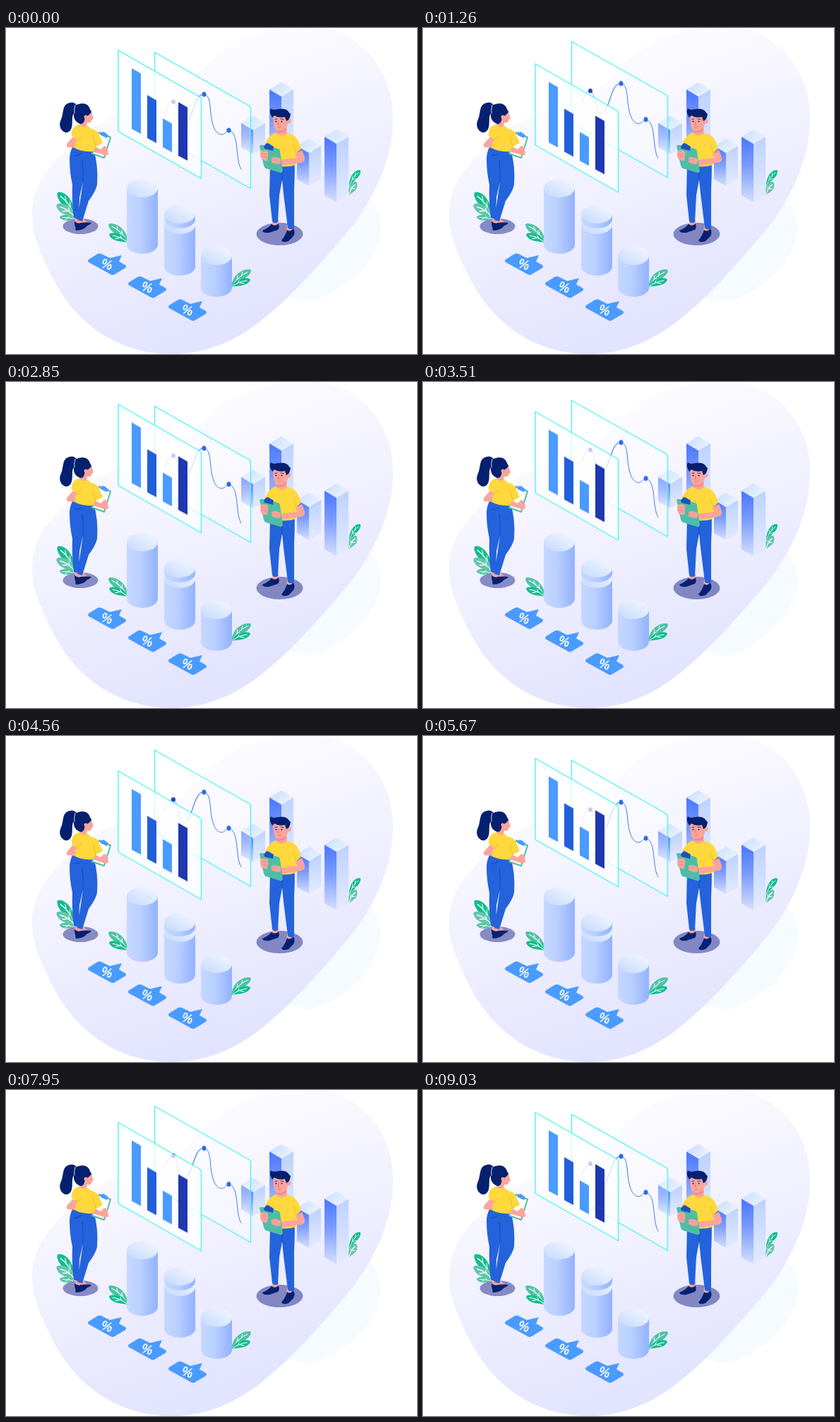
Write an HTML page that moves like this. It is 582x462 px and loops after 9060 ms.

```html
<!DOCTYPE html>
<html lang="en">
<head>
<meta charset="utf-8">
<title>Isometric analytics</title>
<style>
html, body { margin: 0; width: 100%; height: 100%; overflow: hidden; background: #fff; }
svg { display: block; width: 582px; height: 462px; }
.panel { animation: drift 9060ms infinite; }
.front { --shift: 20px; }
.back { --shift: -16px; }
@keyframes drift {
  0%, 30.46%, 63.47%, 100% {
    transform: translateY(0);
    animation-timing-function: cubic-bezier(.33, 0, .63, 1);
  }
  15.89%, 46.96%, 80.68% {
    transform: translateY(var(--shift));
    animation-timing-function: cubic-bezier(.37, 0, .67, 1);
  }
}
.sheet { stroke: #3ff5f3; stroke-width: 1.3; stroke-linejoin: round; }
.vein { fill: none; stroke: #fff; stroke-width: 1; stroke-linecap: round; }
.skin { fill: #f9a59b; }
.navy { fill: #05206f; }
.shirt { fill: #ffd83d; }
.jeans { fill: #2463dc; }
.teal { fill: #4fbda6; }
.sky { fill: #4a9bff; }
.line { fill: none; stroke-linecap: round; stroke-linejoin: round; }
text { font: 600 19px "Open Sans", Arial, sans-serif; fill: #fff; text-anchor: middle; }
</style>
</head>
<body>
<svg viewBox="0 0 582 462" xmlns="http://www.w3.org/2000/svg">
<defs>
  <linearGradient id="ground" gradientUnits="userSpaceOnUse" x1="43" y1="123" x2="165" y2="472">
    <stop stop-color="#fcfbff"/><stop offset="1" stop-color="#e3e4ff"/>
  </linearGradient>
  <linearGradient id="tube">
    <stop stop-color="#c6d8ff"/><stop offset=".45" stop-color="#b9cfff"/><stop offset="1" stop-color="#92b2ff"/>
  </linearGradient>
  <linearGradient id="lid" x1="0" y1="1" x2="1" y2="0">
    <stop stop-color="#c4d9ff"/><stop offset="1" stop-color="#f4f8ff"/>
  </linearGradient>
  <linearGradient id="lit" x1="0" y1="0" x2="0" y2="1">
    <stop stop-color="#4a76ff"/><stop offset=".45" stop-color="#7c9cff"/><stop offset="1" stop-color="#d6dffe"/>
  </linearGradient>
  <linearGradient id="pale" x1="0" y1="0" x2="0" y2="1">
    <stop stop-color="#bcd2ff"/><stop offset="1" stop-color="#e5ebff"/>
  </linearGradient>
  <linearGradient id="cap" x1="0" x2="1" y1="0" y2=".6">
    <stop stop-color="#c6dcff"/><stop offset="1" stop-color="#eaf3ff"/>
  </linearGradient>
  <g id="tall">
    <path d="M0 0C-1-12 10-25 24-25C28-25 27-22 26-20C22-12 9-9 0 0Z"/>
    <path class="vein" d="M1-2Q8-15 22-21M7-10L8-16M13-15L15-21M9-11L17-12"/>
  </g>
  <g id="low">
    <path d="M0 0C3-9 13-15 24-12C27-11 26-9 24-7C19-1 8-2 0 0Z"/>
    <path class="vein" d="M1-1Q10-8 21-9M8-5L10-9M11-6L17-5"/>
  </g>
  <g id="plant">
    <use href="#tall" fill="#4dc3a2"/>
    <use href="#low" fill="#12bd8d"/>
  </g>
  <g id="tag">
    <path class="sky" d="M117 328L130 320Q132 319 135 320L147 326L164 322L160 331L169 336Q171 338 169 340L154 349Q151 351 148 349L117 332Q115 330 117 328Z"/>
    <text transform="matrix(.95 .28 -.38 .92 140.500 341)">%</text>
  </g>
</defs>

<!-- Ground -->
<path fill="#f6fbff" d="M505 235C528 250 534 273 529 297C520 334 480 374 430 388L395 380Z"/>
<path fill="url(#ground)" d="M432-2C502 2 548 60 548 128C548 195 512 256 479 294C440 340 400 385 357 418C320 446 280 462 235 462C155 462 95 415 64 350C47 315 36 290 37 262C38 215 70 185 110 150C150 118 200 115 240 92C282 67 300-2 432-2Z"/>

<!-- Towers -->
<g id="towers"></g>
<use href="#tall" fill="#12bd8d" transform="translate(486 225) scale(.6 .95)"/>
<use href="#low" fill="#63c6ab" transform="translate(486 237) rotate(-22) scale(.65 1.200)"/>

<!-- Panels -->
<g class="panel back">
  <path class="sheet" fill="#fff" fill-opacity=".35" d="M210.500 34.500L344 110Q346.500 112 346.500 114V227.500L210.500 150Z"/>
  <g class="line" stroke="#3f78ea" stroke-width="1">
    <path stroke="#9aa9dc" d="M224 122C229 111 231 104 237 104C245 107 242 137 252 137C264 136 266 92 281 94"/>
    <path d="M257 133C267 120 267 92 281 94C291 97 288 116 292 133C295 146 300 151 306 151C311 150 312 145 316 145C331 150 324 186 333 200"/>
  </g>
  <g fill="#2d6be2">
    <ellipse cx="237" cy="104.500" rx="3" ry="3.300" fill="#1c46b8"/>
    <ellipse cx="280.500" cy="94" rx="3" ry="3.500"/>
    <ellipse cx="315.500" cy="145" rx="3" ry="3.500"/>
  </g>
</g>
<g class="panel front">
  <path class="sheet" fill="#fff" fill-opacity=".74" d="M159 31.500L275 98Q276.500 99 276.500 101V213.500L159 146.500Z"/>
  <path class="sky" d="M178 57L191 64.500V150L178 143ZM222 128L235 135.500V176L222 169Z"/>
  <path fill="#225fda" d="M200 95L213 102.500V163L200 156Z"/>
  <path fill="#1f38b0" d="M244 105L257 112.500V188L244 181Z"/>
</g>

<!-- Cylinders and tags -->
<use href="#plant" transform="matrix(-1 0 0 1.080 172 304)"/>
<use href="#plant" transform="translate(320 367)"/>
<g id="tubes"></g>
<use href="#tag"/>
<use href="#tag" x="57" y="32.500"/>
<use href="#tag" x="114" y="65"/>

<!-- Woman -->
<g transform="matrix(-1 0 0 1 98 270)">
  <use href="#tall" fill="#12bd8d" transform="scale(.95 1.500)"/>
  <use href="#low" fill="#63c6ab" transform="translate(0 -1) rotate(-7) scale(1.100 1.400)"/>
  <use href="#low" fill="#4dc3a2" transform="translate(0 2) rotate(12) scale(.8)"/>
</g>
<ellipse cx="105.500" cy="281" rx="25" ry="11" fill="#868bc5"/>
<g>
  <path class="skin" d="M97 268L107 268L117 277L104 281L98 277Z"/>
  <path class="navy" d="M97 274Q102 278 106 276Q113 275 121 276Q118 281 108 281L100 285Q97 283 97 274Z"/>
  <path class="navy" d="M98 284Q108 280 115 280Q110 287 99 287Z"/>
  <path class="jeans" d="M94 169L124 172Q131 195 129 222Q128 230 117 245L108 274L101 272L106 238L109 218L104 240L103 271L96 269Q93 245 94 222Q90 204 90 186Q90 177 94 169Z"/>
  <path class="line" stroke="#1748b8" d="M108 187Q110 204 109 218M97 181Q103 181 107 177"/>
  <path fill="#fff" stroke="#4fbda6" stroke-width="2" stroke-linejoin="round" d="M132 148L148 155L139 184L122 178Z"/>
  <path class="sky" d="M133 149Q137 146 140 148L145 152L143 156L134 152Z"/>
  <path class="skin" d="M95 154L88 162Q84 166 87 169L101 170L103 164L98 163L105 155Z"/>
  <path class="skin" d="M124 167L134 172L139 167Q142 167 144 172L145 179Q141 182 136 179L122 175Z"/>
  <path class="shirt" d="M97 140Q103 135 112 136L121 143Q130 144 133 154L137 163L126 169L123 175Q107 176 97 170L101 158L93 153Q92 144 97 140Z"/>
  <path class="line" stroke="#eeb70b" stroke-width=".8" d="M123 152L127 168M106 153L101 160"/>
  <path class="skin" d="M107 124L121 117Q122 124 124 128L121 131Q121 135 115 134L114 139Q109 142 104 137Z"/>
  <path class="navy" d="M119 115Q116 106 107 107Q101 108 100 109Q96 104 90 106C78 109 83 120 77 132C74 140 80 149 87 148C98 144 91 127 96 121Q95 131 103 135Q109 138 111 131L112 126Q118 124 121 119Z"/>
  <path class="line" stroke="#fff" stroke-width=".8" d="M98 109Q96 115 97 121"/>
  <circle class="skin" cx="113" cy="126" r="2.500"/>
</g>

<!-- Man -->
<ellipse cx="387.500" cy="292" rx="33" ry="16" fill="#8287c4"/>
<g>
  <path class="skin" d="M378 272H386L387 282H376ZM398 279H407L408 290H397Z"/>
  <path class="navy" d="M376 278Q381 282 386 277Q388 283 385 286L373 290Q364 291 363 287Q371 284 376 278Z"/>
  <path class="navy" d="M398 286Q402 290 407 284Q410 290 407 295L400 302Q392 305 390 301Q396 294 398 286Z"/>
  <path class="jeans" d="M374 192L409 190Q409 210 408 229L408 284Q402 287 399 283L393 235L391 215L387 237L385 275Q380 278 377 274L373 237Z"/>
  <path class="line" stroke="#1748b8" d="M392 202Q390 209 391 215"/>
  <path class="shirt" d="M381 148Q389 153 397 148L407 152Q414 156 418 171L411 177L411 194Q393 199 375 194L375 174L367 164Q370 154 381 148Z"/>
  <path class="line" stroke="#eeb70b" stroke-width=".8" d="M407 165L411 178"/>
  <path class="skin" d="M410 178L419 173Q424 184 423 187Q422 190 417 191L391 195Q382 194 377 191L378 185Q383 183 389 187L412 184Z"/>
  <path class="skin" d="M366 168Q360 174 360 178Q360 187 367 190L374 186V169Z"/>
  <path class="teal" d="M359 167Q361 165 364 166L385 171Q388 172 388 175L392 203Q391 206 388 205L368 199Q366 198 365 195Z"/>
  <path fill="#1c52bd" d="M365 168L368 164Q371 162 374 165L379 168L378 174L366 171Z"/>
  <path class="skin" d="M361 174Q367 172 371 175Q372 181 370 188Q363 189 360 182ZM376 184Q383 181 389 186V192Q382 194 376 190Z"/>
  <path class="line" stroke="#e78583" stroke-width=".8" d="M362 178L370 179M363 182L370 183M377 187H384"/>
  <path class="skin" d="M383 139L397 137L398 149Q391 156 383 149Z"/>
  <path fill="#ee8e87" d="M384 145Q391 146 397 140V145Q391 150 384 148Z"/>
  <path class="skin" d="M378 124L398 122L399 137Q396 146 387 146Q380 145 379 138Z"/>
  <circle class="skin" cx="400" cy="132" r="3.500"/>
  <path class="navy" d="M377 127Q372 119 375 114Q378 117 385 115Q397 113 401 120L403 122Q402 128 400 130L397 132L395 126Q386 128 380 124Z"/>
  <g class="navy"><circle cx="382.500" cy="132.500" r="1"/><circle cx="390.500" cy="132.500" r="1"/></g>
  <path class="line" stroke="#05206f" stroke-width=".8" d="M381 129.500L384 129M389 129L393 129.500"/>
  <path class="line" stroke="#d96c70" stroke-width=".8" d="M386 132L385 137H387M385 141Q387 142 389 140.500"/>
</g>
</svg>
<script>
// Prism: centre x, top y, y of the lower side corners
const tower = (x, top, foot) => {
  const l = x - 17, r = x + 17, side = top + 10, mid = top + 20;
  return `<path fill="url(#lit)" d="M${l} ${side}L${x} ${mid}V${foot + 10}L${l} ${foot}Z"/>
    <path fill="url(#pale)" d="M${x} ${mid}L${r} ${side}V${foot}L${x} ${foot + 10}Z"/>
    <path fill="url(#cap)" d="M${x} ${top}L${r} ${side}L${x} ${mid}L${l} ${side}Z"/>`;
};
// Cylinder: left x, y of the upper rim, y of the lower rim
const tube = (x, top, foot) =>
  `<path fill="url(#tube)" d="M${x} ${top}V${foot}A22 13 0 0 0 ${x + 44} ${foot}V${top}Z"/>
   <ellipse cx="${x + 22}" cy="${top}" rx="22" ry="13" fill="url(#lid)"/>`;

document.getElementById("towers").innerHTML =
  tower(390, 77, 180) + tower(350, 124.5, 169) + tower(429, 157, 214) + tower(468, 144, 237);
document.getElementById("tubes").innerHTML =
  tube(171, 227, 307) + tube(224, 279, 338) + tube(224, 264, 271) + tube(276, 323, 368);
</script>
</body>
</html>
```
